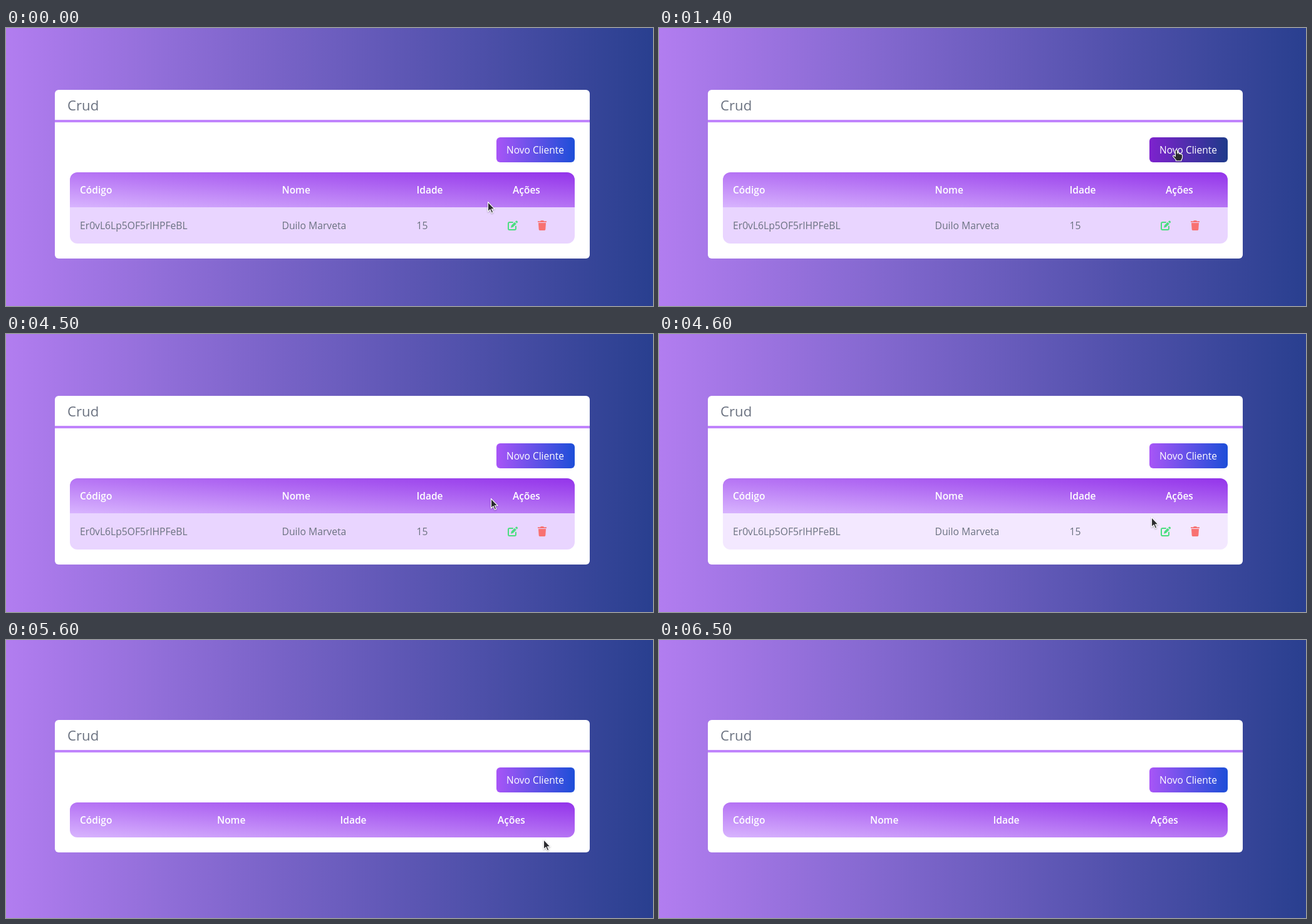
Animation of 1033 by 445 pixels, one loop 7300 ms. Source, as an HTML page:

```html
<!DOCTYPE html>
<html lang="pt-BR">
<head>
<meta charset="utf-8">
<title>Crud</title>
<style>
  html, body { margin: 0; width: 100%; height: 100%; overflow: hidden; }
  body { background: linear-gradient(90deg, #b27df0, #293f8f); }
  svg { display: block; width: 1033px; height: 445px; }
  text { font: 400 15.7px "Open Sans", "Noto Sans", sans-serif; fill: #6b7280; }
  .title { font-size: 22.2px; }
  .light { fill: #fff; font-size: 15.5px; }
  .head text { font-weight: 600; font-size: 15.5px; fill: #fff; }
  #cursor path { fill: #2b2b2e; stroke: #fff; stroke-width: 1.1; stroke-linejoin: round; }
  #cursor { filter: drop-shadow(0 1px 1px rgba(0, 0, 0, .3)); }
</style>
</head>
<body>
<svg viewBox="0 0 1033 445">
  <defs>
    <linearGradient id="idle">
      <stop stop-color="#a855f7"/><stop offset="1" stop-color="#1d4ed8"/>
    </linearGradient>
    <linearGradient id="hover">
      <stop stop-color="#7e22ce"/><stop offset="1" stop-color="#1e3a8a"/>
    </linearGradient>
    <linearGradient id="bar" x1="0" y1="1" x2="1" y2="0">
      <stop stop-color="#d8b4fe"/><stop offset="1" stop-color="#9333ea"/>
    </linearGradient>
    <clipPath id="round"><rect id="table" x="102" y="231" width="806" rx="12"/></clipPath>
  </defs>

  <g id="page">
    <rect id="card" x="78" y="99" width="854" rx="6" fill="#fff"/>
    <text class="title" x="98" y="132">Crud</text>
    <rect x="78" y="147" width="854" height="4" fill="#c084fc"/>
    <rect id="button" x="783" y="175" width="125" height="40" rx="6"/>
    <text class="light" x="799" y="201">Novo Cliente</text>

    <g clip-path="url(#round)">
      <rect x="102" y="231" width="806" height="56" fill="url(#bar)"/>
      <rect id="row" x="102" y="287" width="806" height="58"/>
    </g>
    <g class="head" id="head">
      <text y="265">Código</text>
      <text y="265">Nome</text>
      <text y="265">Idade</text>
      <text y="265">Ações</text>
    </g>

    <g id="client">
      <text x="118" y="322">Er0vL6Lp5OF5rlHPFeBL</text>
      <text x="440.5" y="322">Duilo Marveta</text>
      <text x="655.5" y="322">15</text>
      <g transform="translate(801 308)" fill="#4ade80">
        <path d="M8 3H3Q1 3 1 5V13Q1 15 3 15H11Q13 15 13 13V9.5" fill="none" stroke="#4ade80" stroke-width="2" stroke-linecap="round"/>
        <path d="M5 11.7 5.8 8 11.1 2.7 13.8 5.4 8.5 10.8Z"/>
        <path d="M12 2 13.2.8Q14.2 0 15.2.9L15.7 1.4Q16.5 2.4 15.7 3.3L14.5 4.5Z"/>
      </g>
      <path id="trash" transform="translate(849 308)" d="M0 1.2H4L5 0H9L10 1.2H14V3H0ZM1 4H13L12.3 14.6Q12.2 16 10.8 16H3.2Q1.8 16 1.7 14.6Z"/>
    </g>
  </g>

  <g id="cursor">
    <path id="arrow" d="M.5.5V16L4 12.7 6.4 18.2 8.8 17.1 6.4 11.7H11Z"/>
    <path id="hand" d="M-1.6 1.5Q-1.5 0 0 0T1.6 1.5V6Q3 .4 4.5 6.6 6.2 5.2 7 7.2 9.4 6.4 9.6 9V12.4Q9.4 14.6 8 15.7V17.7H-.8V16L-5 11.2Q-6 9.4-4.4 8.9-3.4 8.6-1.6 10.6Z"/>
  </g>
</svg>
<script>
  const LOOP = 7300, STEP = 100, DELETED = 5600, LEFT = 6500;

  // Each move is a quadratic curve: from, bend, to. The pointer rests at its end.
  const moves = [
    { at: 0, ms: 500, path: [[769, 278], [792, 242], [800, 233]] },
    { at: 600, ms: 800, path: [[800, 233], [806, 205], [826, 195]] },
    { at: 4200, ms: 400, path: [[782, 195], [755, 230], [786, 293]] },
    { at: 4600, ms: 500, path: [[786, 293], [824, 307], [858, 317]] },
    { at: DELETED, ms: 600, path: [[858, 319], [858, 235], [816, 179]] },
    { at: 6300, ms: 100, path: [[816, 179], [655, 111], [495, 43]] }
  ];

  const el = id => document.getElementById(id);
  const set = (id, name, value) => el(id).setAttribute(name, value);
  const show = (id, on) => el(id).style.display = on ? "" : "none";

  function pointer(t) {
    const { at, ms, path: [a, b, c] } = moves.filter(m => m.at <= t).pop();
    const u = Math.min((t - at) / ms, 1), v = 1 - u;
    return a.map((_, i) => v * v * a[i] + 2 * u * v * b[i] + u * u * c[i]);
  }

  function draw(time) {
    const t = Math.floor(time / STEP) * STEP;
    const filled = t < DELETED;
    const rowHeight = filled ? 58 : 0;
    const shift = filled ? 0 : 29;
    const [x, y] = pointer(t);
    const over = (l, top, w, h) => x >= l && x <= l + w && y >= top && y <= top + h;
    const onButton = over(781, 175 + shift, 127, 40);
    const onRow = filled && over(102, 287, 806, 58);
    const onTrash = filled && over(849, 308, 14, 16);
    const hand = onButton || onTrash;

    set("page", "transform", `translate(0 ${shift})`);
    set("card", "height", 212 + rowHeight);
    set("table", "height", 56 + rowHeight);
    const columns = filled ? [118, 440.5, 655.5, 809] : [118, 337, 533.5, 785];
    columns.forEach((left, i) => el("head").children[i].setAttribute("x", left));
    show("client", filled);
    show("row", filled);

    set("button", "fill", `url(#${onButton ? "hover" : "idle"})`);
    set("row", "fill", onRow ? "#f3e8ff" : "#e9d5ff");
    set("trash", "fill", onTrash ? "#dc2626" : "#f87171");
    set("cursor", "transform", `translate(${Math.round(x)} ${Math.round(y)})`);
    show("cursor", t < LEFT);
    show("arrow", !hand);
    show("hand", hand);
  }

  const origin = performance.now();
  function frame() {
    draw((performance.now() - origin) % LOOP);
    requestAnimationFrame(frame);
  }
  frame();
</script>
</body>
</html>
```
